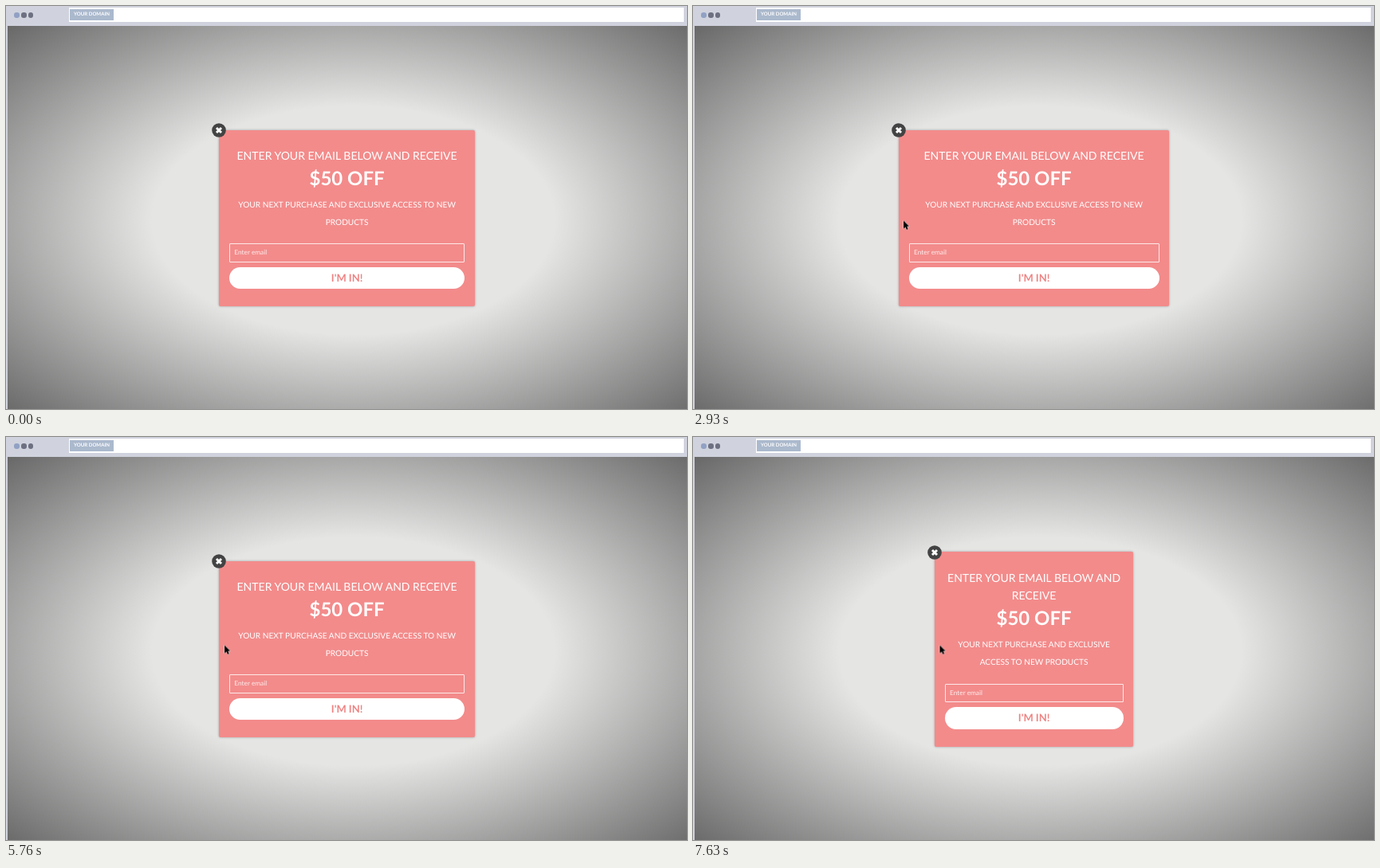
An HTML page for the animation above (8.16 s loop, 854 by 506 pixels).

```html
<!DOCTYPE html>
<html lang="en">
<head>
<meta charset="utf-8">
<title>Resizable popup</title>
<style>
  :root { --pink: #f38b8b; --frame: #d0d3dd; --loop: 8160ms linear infinite; }
  * { box-sizing: border-box; }
  html, body { margin: 0; width: 100%; height: 100%; overflow: hidden; }
  body { font-family: Lato, sans-serif; text-rendering: geometricPrecision; }
  svg { position: absolute; display: block; overflow: visible; }

  .stage { position: relative; width: 854px; height: 506px; overflow: hidden; background: var(--frame); }

  .dot { position: absolute; top: 8.4px; width: 6.4px; height: 6.4px; border-radius: 50%; background: #6c7080; }
  .address { position: absolute; left: 78.5px; top: 2px; width: 771px; height: 17.5px; background: #fff; }
  .tag {
    position: absolute; left: 1.5px; top: 2px; width: 55px; height: 13.5px;
    background: #abb9cd; color: #fff; font: bold 6.15px/13.5px Lato, sans-serif; text-align: center;
  }
  .page {
    position: absolute; left: 1.5px; top: 25px; width: 852px; height: 481px;
    background: radial-gradient(ellipse 615px 350px at 433.5px 244px, #e5e5e4 41%, #666 100%);
  }

  .holder {
    position: absolute; left: 0; top: 25px; width: 855.2px; height: 483px;
    display: flex; align-items: center; justify-content: center;
  }
  .card {
    position: relative; flex: none; padding: 21.2px 12.5px 22px; border-radius: 2px;
    background: var(--pink); color: #fff; text-align: center;
    box-shadow: 0 0 3px rgba(0, 0, 0, .32);
    animation: resize var(--loop);
  }
  .close { left: 0; top: .3px; }
  .title { font-size: 14px; line-height: 22.4px; }
  .offer { font-size: 24px; font-weight: bold; line-height: 36.4px; }
  .note { position: relative; margin: 4.5px 0 15.5px; font-size: 10.15px; line-height: 21.4px; }
  .field {
    height: 23.5px; border: 1px solid #fde9e8; border-radius: 1px; padding-left: 5.5px;
    font-size: 8.3px; line-height: 21.5px; text-align: left; color: #fdeceb;
  }
  .button {
    height: 27.5px; margin-top: 6px; border-radius: 14px; background: #fff;
    color: #ef8383; font-size: 13px; font-weight: bold; line-height: 27.5px;
  }

  .hover {
    position: absolute; inset: -2.7px -2.5px -3px; background: rgba(60, 167, 231, .53);
    display: flex; align-items: center; justify-content: center;
    font-size: 6.35px; font-weight: bold; line-height: 7.5px;
    text-shadow: 0 0 1px #222, .6px .6px 1px #222, -.6px .6px 1px #222, 0 -.6px 1px #222;
    animation: hover var(--loop);
  }
  .tool { position: absolute; top: -5.5px; height: 13px; background: #fff; border: 1px solid #77727a; }
  .eye { right: 22.5px; width: 18.5px; }
  .drop { right: 3px; width: 14px; }

  .cursor { left: 0; top: 0; animation: point var(--loop); }

  @keyframes resize {
    0%, 31.37% { width: 320.5px; }
    35.91% { width: 339px; }
    40.81%, 46.94% { width: 354px; }
    47.43%, 58.33% { width: 358px; animation-timing-function: ease-in-out; }
    62.01%, 70.59% { width: 320.5px; animation-timing-function: ease-in-out; }
    80.39%, 80.88% { width: 247px; }
    81.62%, 85.78% { width: 240px; animation-timing-function: ease-in-out; }
    93.5%, 100% { width: 249px; }
  }
  @keyframes hover {
    0%, 100% { visibility: hidden; animation-timing-function: step-end; }
    13.85% { visibility: visible; animation-timing-function: step-end; }
    20.4% { visibility: hidden; animation-timing-function: step-end; }
  }
  @keyframes point {
    0%, 6.12% { visibility: hidden; transform: translate(838px, 310px); }
    6.127% { visibility: visible; transform: translate(838px, 310px); animation-timing-function: ease-out; }
    8.09%, 10.17% { transform: translate(700px, 296px); }
    15.93% { transform: translate(375px, 284.5px); }
    19.98% { transform: translate(282px, 272px); animation-timing-function: ease-out; }
    22.06%, 31.37% { transform: translate(273.5px, 269.5px); }
    35.91% { transform: translate(264px, 269.5px); }
    40.81%, 46.94% { transform: translate(257px, 268px); animation-timing-function: ease-in-out; }
    50% { transform: translate(192px, 266px); animation-timing-function: ease-in; }
    52.21% { transform: translate(238.7px, 266px); animation-timing-function: ease-out; }
    56.37%, 58.33% { transform: translate(255px, 264px); animation-timing-function: ease-in-out; }
    62.01%, 70.59% { transform: translate(274px, 261.5px); animation-timing-function: ease-in-out; }
    80.39%, 80.88% { transform: translate(310.5px, 261.5px); }
    81.62%, 85.78% { transform: translate(313.7px, 261.5px); animation-timing-function: ease-in-out; }
    93.5%, 100% { visibility: visible; transform: translate(309.5px, 261.5px); }
  }
</style>
</head>
<body>
<div class="stage">
  <i class="dot" style="left:10.3px;background:#90a1c4"></i>
  <i class="dot" style="left:19.2px"></i>
  <i class="dot" style="left:27.8px"></i>
  <div class="address"><div class="tag">YOUR DOMAIN</div></div>
  <div class="page"></div>

  <div class="holder">
    <div class="card">
      <div class="title">ENTER YOUR EMAIL BELOW AND RECEIVE</div>
      <div class="offer">$50 OFF</div>
      <div class="note">
        YOUR NEXT PURCHASE AND EXCLUSIVE ACCESS TO NEW PRODUCTS
        <div class="hover">
          <span>CLICK TO EDIT,<br>DRAG TO MOVE</span>
          <div class="tool eye">
            <svg width="16.5" height="11" viewBox="0 0 16.5 11" fill="none" stroke="#555">
              <path d="M2.5 5.5Q8.2 -.5 14 5.5Q8.2 11.5 2.5 5.5Z" stroke-width="1.2"/>
              <circle cx="8.2" cy="5.3" r="1.9" fill="#555" stroke="none"/>
              <path d="M5.2 1L11.4 10" stroke-width="1.2"/>
            </svg>
          </div>
          <div class="tool drop">
            <svg width="12" height="11" viewBox="0 0 12 11" stroke="#444" stroke-width="1.7">
              <path d="M3.3 2.8L8.7 8.2M8.7 2.8L3.3 8.2"/>
            </svg>
          </div>
        </div>
      </div>
      <div class="field">Enter email</div>
      <div class="button">I'M IN!</div>
      <svg class="close" width="1" height="1">
        <circle r="8.8" fill="#434343"/>
        <path d="M-3 -3L3 3M3 -3L-3 3" stroke="#fff" stroke-width="2.9"/>
      </svg>
    </div>
  </div>

  <svg class="cursor" width="8" height="12">
    <path d="M0 0V10L2.4 7.9L4 11.4L5.7 10.6L4.2 7.3H7.2Z" fill="#000" stroke="#fff" stroke-width=".8" paint-order="stroke"/>
  </svg>
</div>
</body>
</html>
```
